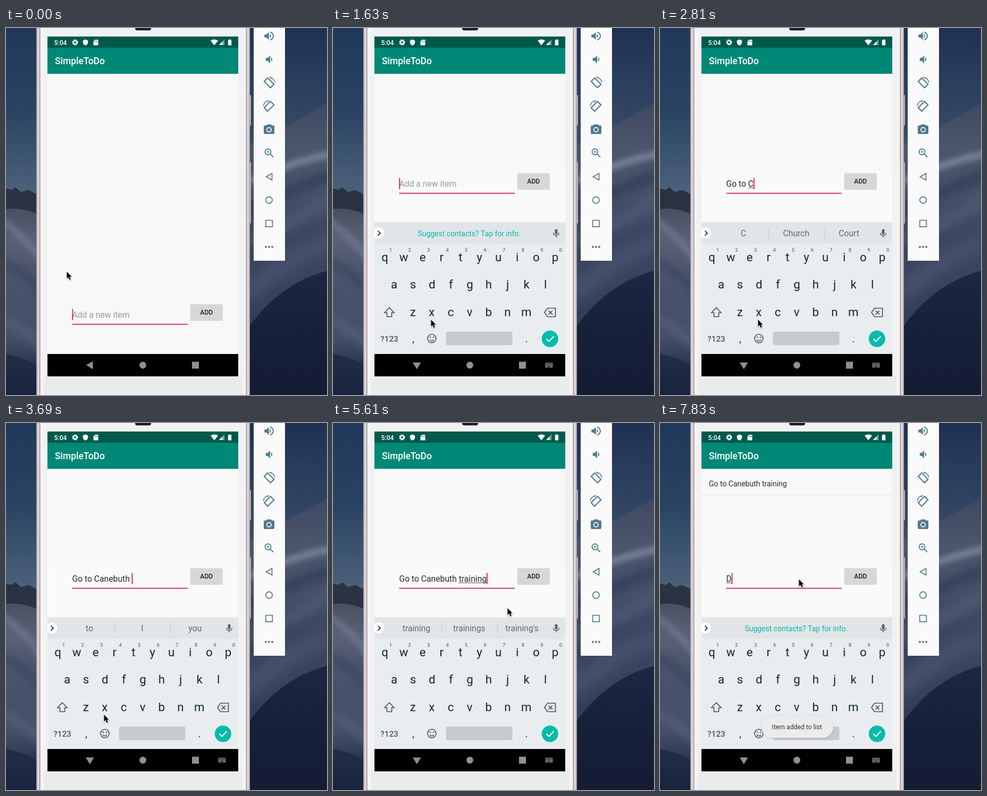
Write an HTML page with a canvas that moves like this. It is 604 by 689 pixels and loops after 8000 ms.

```html
<!DOCTYPE html>
<html lang="en">
<head>
<meta charset="utf-8">
<title>SimpleToDo</title>
<style>
html, body { margin: 0; width: 100%; height: 100%; overflow: hidden; }
canvas { display: block; width: 604px; height: 689px; }
</style>
</head>
<body>
<canvas id="stage" width="604" height="689"></canvas>
<script>
const ctx = document.getElementById('stage').getContext('2d');
const LOOP = 8000;
const ACCENT = '#de1467', TEAL = '#04bba9', PANEL_INK = '#50798c', KEY_INK = '#0b2a34';
const PLACE = 'Canebuth';
const TASK = `Go to ${PLACE} training`;
const CONTACTS = 'Suggest contacts? Tap for info.';

// [time, typed text, suggestions]
const typing = [
  [0, '', ''],
  [1770, 'G', ''],
  [1920, 'Go', 'Go Good God'],
  [2070, 'Go ', 'to and home'],
  [2210, 'Go t', 't to the'],
  [2360, 'Go to ', 'the a be'],
  [2810, 'Go to C', 'C Church Court'],
  [2960, 'Go to ' + PLACE.slice(0, 2), 'Ca Can Call'],
  [3100, 'Go to ' + PLACE.slice(0, 4), 'Cane Canes Caned'],
  [3250, 'Go to ' + PLACE.slice(0, 5), 'Cane Canes Cancel'],
  [3400, 'Go to ' + PLACE.slice(0, 7), 'Cane Canes Cancel'],
  [3540, 'Go to ' + PLACE, 'Cane Canes Cancel'],
  [3690, TASK.slice(0, 15), 'to I you'],
  [3840, TASK.slice(0, 16), 't the to'],
  [4140, TASK.slice(0, 17), 'tr try true'],
  [4580, TASK.slice(0, 18), 'tra trail train'],
  [4880, TASK.slice(0, 19), 'trai train trail'],
  [5030, TASK.slice(0, 20), 'train trains training'],
  [5170, TASK.slice(0, 22), "training trainings training's"],
  [5320, TASK, "training trainings training's"],
  [6050, '', ''],
  [7830, 'D', '']
];
const pointer = [
  [0, 114, 457], [150, 108, 478], [300, 167, 583], [440, 182, 560], [590, 184, 547],
  [5460, 240, 466], [5610, 328, 347], [5750, 369, 299], [5900, 375, 287],
  [6200, 366, 288], [6340, 318, 291], [6490, 274, 293], [6640, 261, 293]
];
const caretToggles = [590, 1040, 1480, 1630, 6640, 7090, 7530, 7830];

const at = (list, t) => list.filter(k => k[0] <= t).pop();

function rect(x, y, w, h, color, r = 0) {
  ctx.fillStyle = color;
  ctx.beginPath();
  ctx.roundRect(x, y, w, h, r);
  ctx.fill();
}
function disc(x, y, r, color) {
  ctx.fillStyle = color;
  ctx.beginPath();
  ctx.arc(x, y, r, 0, Math.PI * 2);
  ctx.fill();
}
function text(s, x, y, size, color, weight = 400, align = 'left') {
  ctx.font = `${weight} ${size}px Roboto, sans-serif`;
  ctx.fillStyle = color;
  ctx.textAlign = align;
  ctx.fillText(s, x, y);
  return ctx.measureText(s).width;
}
function shape(d, color, x = 0, y = 0, scale = 1) {
  ctx.save();
  ctx.translate(x, y);
  ctx.scale(scale, scale);
  ctx.fillStyle = color;
  ctx.fill(new Path2D(d), 'evenodd');
  ctx.restore();
}
function line(d, color, width = 2, x = 0, y = 0) {
  ctx.save();
  ctx.translate(x, y);
  ctx.strokeStyle = color;
  ctx.lineWidth = width;
  ctx.stroke(new Path2D(d));
  ctx.restore();
}
function gradient(x0, y0, x1, y1, ...colors) {
  const g = ctx.createLinearGradient(x0, y0, x1, y1);
  colors.forEach((c, i) => g.addColorStop(i / (colors.length - 1), c));
  return g;
}
function glow(d, color, width, blur) {
  ctx.filter = `blur(${blur}px)`;
  line(d, color, width);
  ctx.filter = 'none';
}

function wallpaper() {
  rect(0, 0, 604, 689, gradient(0, 0, 0, 310, '#20385a', '#2b4362', '#4c627b'));
  rect(458, 0, 146, 260, gradient(0, 0, 0, 220, '#1f3152', '#2b3f5e', '#3a4d68'));
  [[15, 200], [41, 116], [28, 45], [548, 74], [582, 32]].forEach(([x, y]) => disc(x, y, .6, '#8ba0b8'));

  shape('M0 301L10 304L18 299L28 308L42 304L60 313V370H0Z', '#2b3342');
  shape('M0 340Q30 336 60 350V689H0Z', gradient(0, 338, 0, 640, '#474f62', '#596177', '#4c556d', '#465069', '#465069', '#26314b'));
  glow('M-10 362Q30 385 70 440', '#737b8f', 9, 6);
  glow('M-10 440Q30 450 70 500', '#3a445d', 12, 8);
  glow('M-10 545Q30 560 70 600', '#566078', 12, 8);
  shape('M0 612Q35 618 60 634V689H0Z', gradient(0, 612, 0, 689, '#222d47', '#18233d'));

  shape('M458 218Q535 182 604 142V600H458Z', gradient(0, 145, 0, 560, '#3f4a62', '#4b566d', '#46516a', '#3a4560', '#38435e', '#303b56'));
  glow('M450 290Q540 250 615 236', '#848da1', 10, 6);
  glow('M450 345Q540 300 615 276', '#2f3a55', 16, 9);
  glow('M450 400Q540 370 615 318', '#515c75', 16, 10);
  glow('M450 505Q530 425 615 400', '#4a556f', 26, 14);
  shape('M458 560Q518 478 604 456V689H458Z', gradient(0, 460, 0, 689, '#1b2743', '#162039', '#141c34'));
}

function phoneBody() {
  rect(458, 126, 3, 57, '#b9b2b5', 1);
  rect(458, 252, 3, 115, '#b9b2b5', 1);
  rect(57, 0, 402, 689, '#a89ea2');
  rect(58.5, 0, 399, 689, '#dcd3d5');
  rect(63, 0, 390, 689, '#9c9297');
  rect(64.5, 0, 387, 689, '#f5f3f3');
  rect(71, 0, 374, 689, '#f0f1f2');
  rect(72, 654, 373, 35, '#e9ebed');
  rect(243, -6, 30, 10.5, '#1c1b2a', 4);
}

function statusBar() {
  rect(78, 16, 359, 21, '#005a4c');
  text('5:04', 90.5, 31.5, 12.2, '#fff', 500);
  ctx.setLineDash([2.1, 1.8]);
  line('M4.9 0A4.9 4.9 0 1 1 -4.9 0A4.9 4.9 0 1 1 4.9 0', '#fff', 1.6, 130, 27);
  ctx.setLineDash([]);
  line('M3.2 0A3.2 3.2 0 1 1 -3.2 0A3.2 3.2 0 1 1 3.2 0', '#fff', 2.4, 130, 27);
  shape('M0 -5.5L4.7 -3.5V0C4.7 3 2.5 5 0 5.7C-2.5 5 -4.7 3 -4.7 0V-3.5Z', '#fff', 149.5, 27);
  shape('M-1.5 -5H4.5V5.5H-4.5V-2ZM-2 -3V-1H-1V-3ZM.2 -3V-1H1.2V-3ZM2.4 -3V-1H3.4V-3Z', '#fff', 169, 27);
  shape('M-7 -3.2Q0 -8 7 -3.2L0 5.5Z', '#fff', 392, 27);
  shape('M5 -5.5V5H-5Z', '#7fa9a2', 406, 27);
  shape('M1 -1.5V5H-5Z', '#fff', 406, 27);
  shape('M-1.4 -5.5H1.4V-4.4H3.2V5.5H-3.2V-4.4H-1.4Z', '#fff', 421, 27);
}

function appBar() {
  rect(78, 37, 359, 49, '#008876');
  text('SimpleToDo', 92, 68, 17.46, '#fff', 500);
}

function navBar(keyboard) {
  rect(78, 612, 359, 42, '#000');
  const grey = '#919191';
  shape(keyboard ? 'M150 628H165.5L157.8 640.5Z' : 'M163.5 625.5V640.5L151 633Z', grey);
  disc(257.5, 633, 6.4, grey);
  rect(350, 626.5, 13, 13, grey);
  if (!keyboard) return;
  rect(399.5, 628.5, 14, 9, '#777', 1);
  for (let i = 0; i < 10; i++) rect(401 + i % 5 * 2.4, 630 + Math.floor(i / 5) * 2.4, 1.2, 1.2, '#000');
  rect(403.5, 635, 6, 1.2, '#000');
}

function toolPanel() {
  rect(465.5, 0, 60, 437.5, '#0003');
  rect(466, 0, 59, 437, '#fafafa');
  const speaker = 'M3 9v6h4l5 5V4L7 9H3z';
  const near = 'M16.5 12c0-1.8-1-3.3-2.5-4v8c1.5-.7 2.5-2.2 2.5-4z';
  shape(speaker + near, PANEL_INK, 483.5, 4, .92);
  line('M497 7.3Q503 9.8 503 15Q503 20.2 497 22.7', PANEL_INK, 2);
  shape(speaker + near, PANEL_INK, 486, 48, .92);

  [[103, 1], [147, -1]].forEach(([y, side]) => {
    ctx.save();
    ctx.translate(495, y);
    ctx.scale(side * .95, .95);
    line('M-2.8 -9.7L9.7 2.8L2.8 9.7L-9.7 -2.8Z', PANEL_INK, 2.2);
    line('M1 -11Q10 -9.5 11.2 -1', PANEL_INK, 1.7);
    shape('M-.7 -12L1 -12L4.5 -9.5L3.2 -8.2Z', PANEL_INK);
    ctx.restore();
  });

  rect(485, 183, 20, 16, PANEL_INK, 2);
  rect(490.5, 181, 9, 4, PANEL_INK, 1);
  disc(495, 191, 5, '#fafafa');
  disc(495, 191, 3.2, PANEL_INK);

  line('M5.5 0A5.5 5.5 0 1 1 -5.5 0A5.5 5.5 0 1 1 5.5 0M4 4L10 10', PANEL_INK, 1.8, 493, 232.5);
  line('M-2.6 0H2.6M0 -2.6V2.6', PANEL_INK, 1.2, 493, 232.5);
  line('M500.5 273V285.5L489.5 279.2Z', PANEL_INK, 1.7);
  line('M6.2 0A6.2 6.2 0 1 1 -6.2 0A6.2 6.2 0 1 1 6.2 0', PANEL_INK, 1.7, 495, 323);
  line('M488.7 361H501.3V373.2H488.7Z', PANEL_INK, 1.7);
  [489, 495, 501].forEach(x => disc(x, 411, 2, PANEL_INK));
}

function suggestionStrip(words) {
  rect(78, 364.5, 359, 40, '#e1e5e8');
  rect(78, 364.5, 359, 1, '#eceef0');
  ctx.save();
  ctx.beginPath();
  ctx.rect(78, 365, 359, 40);
  ctx.clip();
  disc(86, 385, 10.5, '#fff');
  ctx.restore();
  line('M84.5 381L89 385.2L84.5 389.5', '#22343b', 1.8);
  if (words) {
    words.split(' ').forEach((w, i) => text(w, 157 + i * 99.3, 391.3, 15.7, '#5f6b71', 400, 'center'));
    rect(204, 375, 1, 21, '#c3c9cc');
    rect(309, 375, 1, 21, '#c3c9cc');
  } else {
    text(CONTACTS, 256.3, 390.5, 13.97, TEAL, 400, 'center');
  }
  rect(417.5, 377.5, 5, 10, '#56646b', 2.5);
  line('M414.7 384.5Q414.7 389.5 420 389.5Q425.3 389.5 425.3 384.5M420 389.5V393', '#56646b', 1.5);
}

function keyboard(words) {
  rect(78, 404, 359, 208, '#e9edf0');
  suggestionStrip(words);
  [['qwertyuiop', 97.5, 437.5], ['asdfghjkl', 115, 489], ['zxcvbnm', 150.3, 540.5]].forEach(([row, x, y]) =>
    [...row].forEach((c, i) => text(c, x + i * 35.6, y, 22.3, KEY_INK, 400, 'center')));
  [...'1234567890'].forEach((c, i) => text(c, 108.5 + i * 35.55, 420, 9.5, '#68757b', 500, 'center'));

  const ink = '#46555c';
  line('M106 525L115 534.5H110.5V542H101.5V534.5H97Z', ink, 1.7);
  line('M403.5 526H418.5V542H403.5L398 534ZM405.5 530.5L413 537.8M413 530.5L405.5 537.8', ink, 1.7);
  text('?123', 106, 588.5, 15.2, ink, 500, 'center');
  text(',', 151, 590, 19, KEY_INK, 400, 'center');
  text('.', 364, 590, 19, KEY_INK, 400, 'center');
  line('M8 0A8 8 0 1 1 -8 0A8 8 0 1 1 8 0M-4 2Q0 7 4 2', ink, 1.6, 186, 583);
  disc(183, 580.5, 1.3, ink);
  disc(189, 580.5, 1.3, ink);
  rect(212.5, 570, 125, 25.5, '#c6cbcf', 3);
  disc(408.3, 583.5, 15.5, TEAL);
  line('M401.5 583.5L406.3 588.3L415.5 578.8', '#fff', 2);
}

function entryRow(t, typed, lift, caretOn) {
  const baseline = 544 - lift;
  let caretX = 125;
  if (typed) {
    caretX += text(typed, 124.5, baseline, 15.7, '#2a2a2a');
    const start = typed.lastIndexOf(' ') + 1;
    const lead = ctx.measureText(typed.slice(0, start)).width;
    const wordWidth = ctx.measureText(typed.slice(start)).width;
    if (wordWidth) rect(124.5 + lead, baseline + 1.5, wordWidth, 1, '#444');
  } else {
    text('Add a new item', 124.5, baseline, 15.7, '#9b9b9b');
  }
  if (caretOn) rect(caretX - .6, 527.5 - lift, 1.8, 21, ACCENT);
  rect(124.5, 555.5 - lift, 217.5, 1.8, ACCENT);

  const pressed = t >= 6050 && t < 6340;
  rect(346.5, 519 - lift, 61.5, 31, '#0000001c', 2);
  rect(347, 518.5 - lift, 60.5, 30, pressed ? '#c3c4c4' : '#d6d7d7', 2);
  text('ADD', 377.3, 537.8 - lift, 12.2, '#222', 500, 'center');
}

function toast(alpha) {
  if (alpha <= 0) return;
  ctx.save();
  ctx.globalAlpha = alpha;
  ctx.shadowColor = '#0002';
  ctx.shadowBlur = 4;
  ctx.shadowOffsetY = 1;
  rect(190.5, 550, 135.5, 41, '#ebecee', 20.5);
  ctx.shadowColor = 'transparent';
  text('Item added to list', 257.7, 575, 12.2, '#333', 400, 'center');
  ctx.restore();
}

function arrow(x, y) {
  const d = 'M.5 .5V13.5L3.4 10.8L5.7 15.8L7.9 14.8L5.8 10.1H9.6Z';
  ctx.save();
  ctx.shadowColor = '#0005';
  ctx.shadowBlur = 2;
  ctx.shadowOffsetY = 1;
  line(d, '#fff', 1.8, x, y);
  ctx.restore();
  shape(d, '#000', x, y);
}

function drawApp(t) {
  const hasKeyboard = t >= 1630;
  const added = t >= 6050;
  const [, typed, words] = at(typing, t);
  const [, px, py] = at(pointer, t);
  const caretOn = caretToggles.filter(k => k <= t).length % 2 === 0;

  rect(78, 86, 359, 526, '#f8f8f8');
  if (added) {
    text(TASK, 92, 119, 13.97, '#2a2a2a');
    rect(78, 134.5, 359, 1, '#dedede');
  }
  if (hasKeyboard) rect(78, 272, 359, 93, '#fafafa');
  entryRow(t, typed, hasKeyboard ? 246 : 0, caretOn);
  if (hasKeyboard) keyboard(words);
  navBar(hasKeyboard);
  toast(t < 6200 ? 0 : t < 6340 ? .4 : t < 6490 ? .8 : 1);
  arrow(px, py);
}

// The surroundings never change, so they are painted once.
wallpaper();
phoneBody();
statusBar();
appBar();
toolPanel();

const began = performance.now();
function frame() {
  drawApp((performance.now() - began) % LOOP);
  requestAnimationFrame(frame);
}
frame();
</script>
</body>
</html>
```
